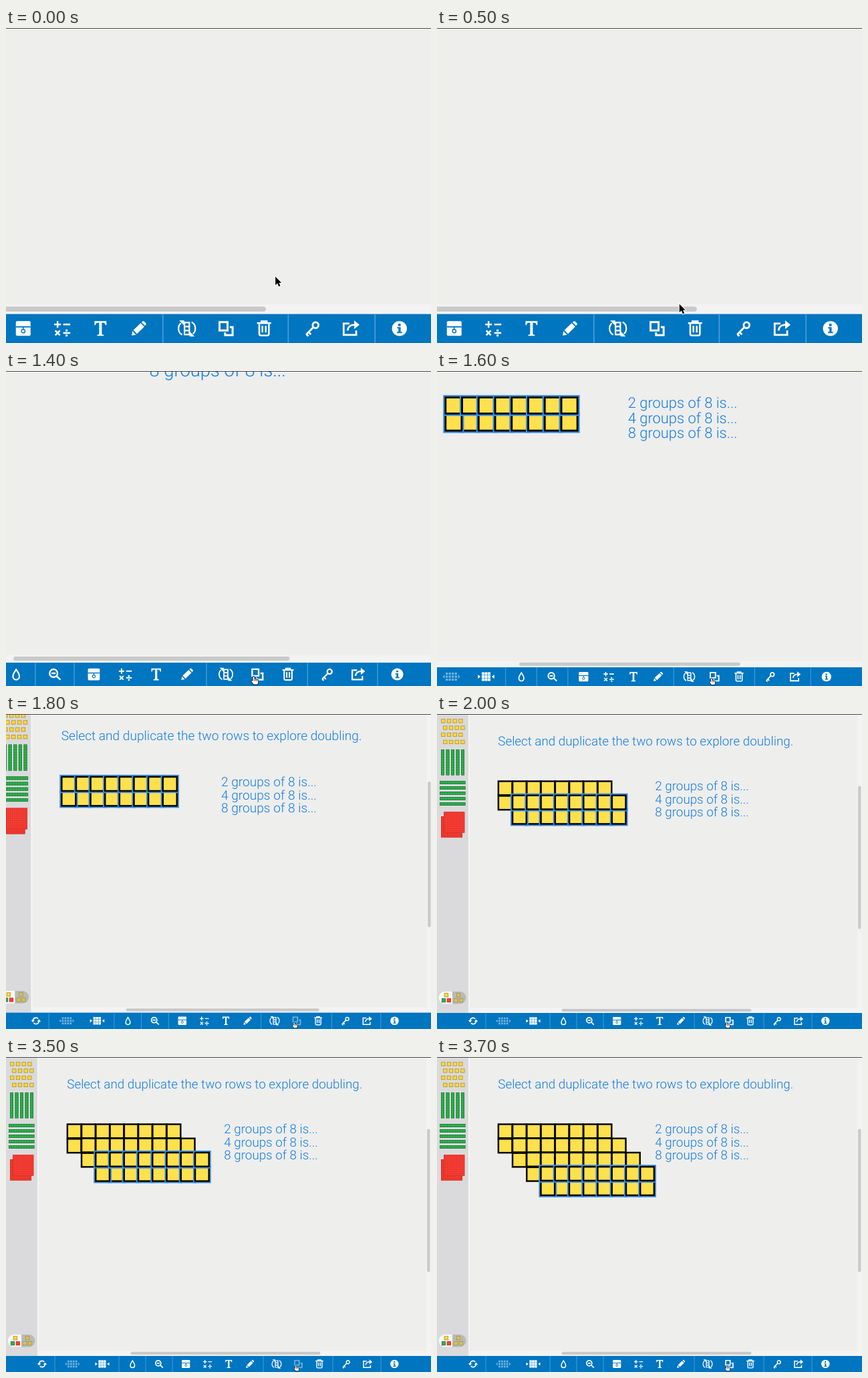
Write an HTML page with a canvas that moves like this. It is 636 by 471 pixels and loops after 5400 ms.

```html
<!DOCTYPE html>
<html lang="en">
<head>
<meta charset="utf-8">
<title>Doubling rows</title>
<style>
html, body { margin: 0; width: 100%; height: 100%; overflow: hidden; background: #eeeeec; }
canvas, svg { position: absolute; left: 0; top: 0; width: 636px; height: 471px; }
text { font: 300 18.8px Roboto, sans-serif; fill: #117be3; text-rendering: geometricPrecision; white-space: pre; }
</style>
</head>
<body>
<canvas id="stage" width="636" height="471"></canvas>
<svg viewBox="0 0 636 471">
  <g id="words">
    <text x="91.3" y="46.9">Select and duplicate the two rows to explore doubling.</text>
    <text x="326.3" y="114.2">2 groups of 8 is...</text>
    <text x="326.3" y="133.5">4 groups of 8 is...</text>
    <text x="326.3" y="152.8">8 groups of 8 is...</text>
  </g>
  <rect width="636" height="1" fill="#48484a"/>
</svg>
<script>
const g = document.getElementById('stage').getContext('2d');
const words = document.getElementById('words');
const LOOP = 5400, STEP = 100;
const BLUE = '#0075c0', YELLOW = '#ffe14d', GREEN = '#33b04f', RED = '#fb3f35';
const PIVOT = { x: 572, y: 471 };
const ZOOM = 1.804;

// Phase of the zoom-out over time, shaped by a cosine
const zoomKeys = [[950, 0], [1000, .049], [1400, .458], [1600, .701], [1800, .905], [2000, 1]];
const copies = [0, 2000, 2700, 3700];
const presses = [[1800, 2000], [2500, 2700], [3500, 3700]];

function box(x, y, w, h, color) {
  g.fillStyle = color;
  g.fillRect(x, y, w, h);
}

function pill(x, y, w, h, r, color) {
  g.fillStyle = color;
  g.beginPath();
  g.roundRect(x, y, w, h, r);
  g.fill();
}

function between(keys, t) {
  if (t <= keys[0][0]) return keys[0][1];
  for (let i = 1; i < keys.length; i++) {
    const [a, va] = keys[i - 1], [b, vb] = keys[i];
    if (t <= b) return va + (vb - va) * (t - a) / (b - a);
  }
  return keys[keys.length - 1][1];
}

function scaleAt(t) {
  const p = (1 - Math.cos(Math.PI * between(zoomKeys, t))) / 2;
  return ZOOM + (1 - ZOOM) * p;
}

// ---- number tiles ----
function tile(x, y, selected) {
  const size = 23.2, edge = 2.5;
  if (selected) box(x - 1.8, y - 1.8, size + 3.6, size + 3.6, '#3f8fe6');
  box(x, y, size, size, '#060606');
  box(x + edge, y + edge, size - 2 * edge, size - 2 * edge, YELLOW);
}

function rows(x, y, selected) {
  const at = i => x + i * 21.25;
  for (let i = 1; i < 8; i++) tile(at(i), y + 21.9, selected);
  tile(x, y + 21.9, selected);
  for (let i = 0; i < 8; i++) tile(at(i), y, selected);
}

function blocks(t) {
  const count = copies.filter(c => t >= c).length;
  for (let i = 0; i < count; i++) {
    rows(90.6 + i * 21.2, 99.3 + i * 21.2, i === count - 1);
  }
}

// ---- sidebar ----
function unit(x, y, color, edge) {
  box(x - 3.1, y - 3.1, 6.2, 6.2, edge);
  box(x - 2.3, y - 2.3, 4.6, 4.6, color);
}

function gridded(x, y, w, h, nx, ny, color, line) {
  box(x, y, w, h, color);
  g.strokeStyle = line;
  g.lineWidth = .5;
  g.beginPath();
  for (let i = 1; i < nx; i++) { g.moveTo(x + w * i / nx, y); g.lineTo(x + w * i / nx, y + h); }
  for (let i = 1; i < ny; i++) { g.moveTo(x, y + h * i / ny); g.lineTo(x + w, y + h * i / ny); }
  g.stroke();
  g.lineWidth = .8;
  g.strokeRect(x + .4, y + .4, w - .8, h - .8);
}

function sidebar() {
  box(0, 0, 47, 447, '#dadadc');
  box(47, 0, 1.5, 447, '#f8f8f8');
  [10.5, 20.5, 31, 41.8].forEach((y, r) => {
    for (let i = 0; i < 4; i++) unit(9.3 + i * 8.7 + (r % 2) * 3, y, '#fbd83f', '#b08f1c');
  });
  for (let i = 0; i < 5; i++) {
    gridded(6 + i * 7.5, 53, 5, 38.5, 1, 10, GREEN, '#1d7d38');
    gridded(4, 100 + i * 8, 38.5, 5, 10, 1, GREEN, '#1d7d38');
  }
  gridded(6, 153, 32, 31.5, 10, 10, RED, '#c9281f');
  gridded(10, 146.3, 31.3, 31.3, 10, 10, RED, '#d3302a');

  pill(2.5, 415, 41, 18.5, 9.2, '#b9b9b6');
  pill(2.5, 415, 20.5, 18.5, [9.2, 0, 0, 9.2], '#fafafa');
  unit(13.8, 420.3, '#fbd83f', '#b08f1c');
  unit(10, 428.2, GREEN, '#1d7d38');
  unit(17.8, 428.2, RED, '#c9281f');
  for (const [x, y] of [[32, 420.3], [28.3, 428.2], [36, 428.2]]) unit(x, y, '#d6c25c', '#a4944a');
}

// ---- toolbar ----
// Each icon: centre x, filled path, stroked path, line width
const icons = {
  reload: [54, 'M-13-2h10l-5 6zM13 2h-10l5-6z', 'M-8-1A8 8 0 0 1 6-5.5M8 1A8 8 0 0 1-6 5.5', 3],
  drop: [189.3, '', 'M0-9C3-4 6-1 6 4a6 6 0 0 1-12 0C-6-1-3-4 0-9z', 2.6],
  zoom: [229, '', 'M-9.5-2a7.3 7.3 0 1 0 14.6 0a7.3 7.3 0 1 0-14.6 0M-6-2h7.6M3.5 3.5L10.5 10', 3],
  ops: [301.3, 'M5.5 1.5h3v3h-3zM5.5 8.8h3v3h-3z',
    'M-11.5-6h10M-6.5-11v10M2-6h10.5M-10 3l7 7M-3 3l-7 7M2 6.6h10.5', 2.5],
  type: [333.3, 'M-9-11h18v6h-1.6q-.5-3.6-3-3.6h-2.4v16q0 2 3 2v1.6h-10v-1.6q3 0 3-2v-16h-2.4q-2.5 0-3 3.6h-1.6z', '', 0],
  pencil: [365, 'M-10.5 10.5l1.2-6.5l5.3 5.3zM-8 2.5L3-8L8.3-2.7L-2.6 8zM4.3-9.3l1.8-1.5q1-.8 2 .2l2.6 2.6q1 1 .2 2l-1.4 1.8z', '', 0],
  turn: [405, 'M-11.5-12h7.5v8zM11.5 12h-7.5v-8z',
    'M-7 9.5C-14 6-14-4-9-8M7-9.5C14-6 14 4 9 8M-3.6-9h7.2v18h-7.2zM-3.6-3h7.2M-3.6 3h7.2', 2.2],
  copy: [437.2, '', 'M-9.3-9.5h12v12.4h-12zM6-2H10.3V9.8H-1V6', 3],
  trash: [469, '', 'M-10.5-8.2h21M-4-8.5v-2.3h8v2.3M-7.2-7.5V8q0 2.5 2.5 2.5h9.4q2.5 0 2.5-2.5V-7.5M-2.5-4v10M2.5-4v10', 2.5],
  key: [509, '', 'M.5-5a4.4 4.4 0 1 0 8.8 0a4.4 4.4 0 1 0-8.8 0M1.8-2L-9 9M-5.5 5.5l3.5 3.5M-9 8.5l3 3', 2.8],
  share: [541, 'M5-12L13-5.6L5 1z', 'M-2-7.5H-10.8V9.6H8V3M-5 3C-4-4 0-5.8 6-5.8', 2.8]
};

function inIcon(x, draw) {
  g.save();
  g.translate(x, 459);
  g.scale(1 / ZOOM, 1 / ZOOM);
  g.fillStyle = g.strokeStyle = '#fff';
  draw();
  g.restore();
}

function icon([x, fill, line, width], alpha) {
  inIcon(x, () => {
    g.globalAlpha = alpha;
    g.fill(new Path2D(fill));
    if (line) {
      g.lineWidth = width;
      g.stroke(new Path2D(line));
    }
  });
}

function toolbar(pressed) {
  box(0, 447, 636, 30, BLUE);
  for (const x of [73, 169, 209, 249, 385, 489, 561]) box(x - .4, 447, .9, 30, '#4c9fd6');
  for (const name in icons) icon(icons[name], name === 'copy' && pressed ? .45 : 1);

  inIcon(99.3, () => {
    g.globalAlpha = .45;
    for (let i = 0; i < 12; i++) g.fillRect(-13 + i % 4 * 7, -9.5 + Math.floor(i / 4) * 7, 5, 5);
    g.fill(new Path2D('M-20 0l4.5-4.5v9zM20 0l-4.5-4.5v9z'));
  });
  inIcon(144, () => {
    for (let i = 0; i < 9; i++) g.fillRect(-10.2 + i % 3 * 7, -10.2 + Math.floor(i / 3) * 7, 6.2, 6.2);
    g.fill(new Path2D('M-13 0l-6-4.5v9zM13 0l6-4.5v9z'));
  });
  inIcon(269.2, () => {
    pill(-11, -11, 22, 22, 2, '#fff');
    box(-11, -3.4, 22, 1.8, BLUE);
    g.fillStyle = g.strokeStyle = BLUE;
    g.lineWidth = 1.5;
    g.stroke(new Path2D('M0-2.5V2'));
    g.beginPath();
    g.arc(0, 3.8, 2.7, 0, 7);
    g.stroke();
  });
  inIcon(581.3, () => {
    g.beginPath();
    g.arc(0, 0, 11.2, 0, 7);
    g.fill();
    g.fillStyle = BLUE;
    g.fill(new Path2D('M-2-7h3.8v3.3h-3.8zM-3.5-2h5.3v7h2v2h-7.3v-2h2v-5h-2z'));
  });
}

function scrollbars() {
  box(48.5, 439.2, 588, 7.8, '#f3f3f3');
  box(0, 439.2, 48.5, 7.8, '#dadadc');
  box(628.8, 0, 8, 447, '#f3f3f3');
  pill(186.5, 440.8, 284, 4.2, 2.1, '#c9c9c9');
  pill(630.2, 107.5, 4.2, 214, 2.1, '#c9c9c9');
}

// ---- pointer ----
const arrow = new Path2D('M0 0V12.6L3 9.9L5.2 14.8L7.4 13.8L5.3 9.1H9z');
const hand = new Path2D('M-1.3 1Q0-.9 1.3 1V5Q2.6 4 3.8 5.3Q5 4.6 6 5.8Q8 5.3 8.2 7.5V10Q8 12 7 14.5H0Q-2 11.5-4 9Q-4.6 6.8-2.8 7.2L-1.3 8.5z');
const creases = new Path2D('M1.4 5v3.6M3.8 5.6v3M6 6v2.6');

function pointer(t) {
  const k = Math.min(Math.max((t - 200) / 600, 0), 1);
  const p = k * k * (3 - 2 * k);
  const x = 478.4 + (433.6 - 478.4) * p;
  const y = 416 + (461.3 - 416) * p;
  g.save();
  g.translate(x, y);
  g.scale(1 / ZOOM, 1 / ZOOM);
  g.lineJoin = 'round';
  if (y > 452) {
    g.lineWidth = 2;
    g.strokeStyle = '#111';
    g.stroke(hand);
    g.fillStyle = '#fff';
    g.fill(hand);
    g.lineWidth = .9;
    g.stroke(creases);
  } else {
    g.lineWidth = 2.2;
    g.strokeStyle = '#fff';
    g.stroke(arrow);
    g.fillStyle = '#000';
    g.fill(arrow);
  }
  g.restore();
}

function draw(t) {
  const s = scaleAt(t);
  const dx = PIVOT.x * (1 - s), dy = PIVOT.y * (1 - s);
  g.setTransform(1, 0, 0, 1, 0, 0);
  box(0, 0, 636, 471, '#eeeeec');
  g.setTransform(s, 0, 0, s, dx, dy);
  scrollbars();
  sidebar();
  blocks(t);
  toolbar(presses.some(([a, b]) => t >= a && t < b));
  pointer(t);
  words.setAttribute('transform', `translate(${dx} ${dy}) scale(${s})`);
}

const start = performance.now();
function tick() {
  const t = (performance.now() - start) % LOOP;
  draw(Math.floor(t / STEP) * STEP);
  requestAnimationFrame(tick);
}
tick();
</script>
</body>
</html>
```
